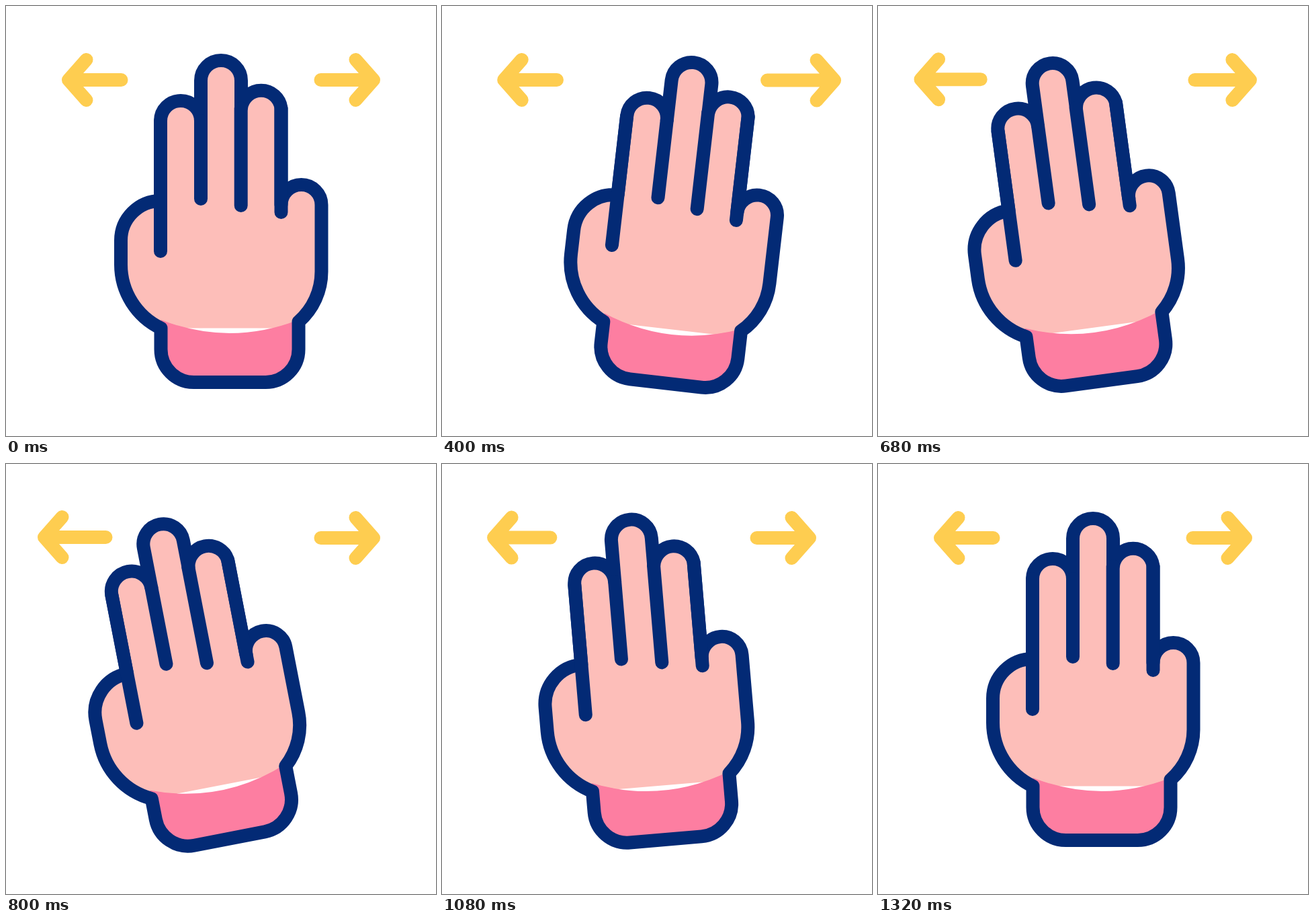
These frames come from a looping animation (640x640 px, 1480 ms). An HTML page:

```html
<!DOCTYPE html>
<html lang="en">
<head>
<meta charset="utf-8">
<title>Three-finger swipe</title>
<style>
  html, body { margin: 0; width: 100%; height: 100%; overflow: hidden; background: #fff; }
  svg { display: block; width: 100vw; height: 100vh; }
  path { fill: none; stroke-width: 20; stroke-linecap: round; stroke-linejoin: round; }
  .arrow { stroke: #fecd50; }
  .skin { fill: #fdbeb9; }
  .wrist { fill: #fd7ea1; }
  .outline { stroke: #032a75; }
</style>
</head>
<body>
<svg viewBox="0 0 640 640">
  <defs>
    <path id="palm" d="M230 290A59 59 0 0 0 171 349V385A105 105 0 0 0 230.5 479.5V511
      A49 49 0 0 0 279.5 560H386.500A49 49 0 0 0 435.500 511V470A99 99 0 0 0 469.500 395
      V296a30 30 0 0 0-60 0V152a30 30 0 0 0-59.500 0V111a30 30 0 0 0-60 0V171a30 30 0 0 0-60 0Z"/>
  </defs>
  <path id="left" class="arrow"/>
  <path id="right" class="arrow"/>
  <g id="hand">
    <use href="#palm" class="skin" style="fill:#fdbeb9"/>
    <path class="skin" d="M230 290A59 59 0 0 0 171 349V385A105 105 0 0 0 230.500 479.500H435.500V470
      A99 99 0 0 0 469.500 395V296a30 30 0 0 0-60 0V152a30 30 0 0 0-59.500 0V111a30 30 0 0 0-60 0V171a30 30 0 0 0-60 0Z"/>
    <path class="wrist" d="M230.500 467Q333 507 435.500 467V511A49 49 0 0 1 386.500 560H279.500A49 49 0 0 1 230.500 511Z"/>
    <use href="#palm" class="outline"/>
    <path class="outline" d="M230 171V365M290 171V287M349.700 152V297M409.500 152V307"/>
  </g>
</svg>
<script>
const LOOP = 1480, STEP = 40;
const KEYS = [40, 360, 800, 1320];
const [hand, left, right] = ["hand", "left", "right"].map(id => document.getElementById(id));

// Smoothstep between one value per key time
function track(t, values) {
  if (t <= KEYS[0]) return values[0];
  for (let i = 1; i < KEYS.length; i++) {
    if (t < KEYS[i]) {
      const u = (t - KEYS[i - 1]) / (KEYS[i] - KEYS[i - 1]);
      return values[i - 1] + (values[i] - values[i - 1]) * u * u * (3 - 2 * u);
    }
  }
  return values[KEYS.length - 1];
}

// dir is -1 for left, 1 for right
function drawArrow(el, dir, tail, tip, y) {
  const back = tip - dir * 26.5;
  el.setAttribute("d", `M${tail} ${y}H${tip}M${back} ${y - 30}L${tip} ${y}L${back} ${y + 30}`);
}

function render(now) {
  const t = Math.floor(now % LOOP / STEP) * STEP;
  const toRight = track(t, [0, 1, 0, 0]);
  const toLeft = track(t, [0, 0, 1, 0]);
  hand.setAttribute("transform", `rotate(${track(t, [0, 7, -11, 0])} 320 560)`);
  drawArrow(left, -1, 171.5 - 23 * toLeft, 93 - 36 * toLeft, 110 - toLeft);
  drawArrow(right, 1, 468.5 + 16 * toRight, 547 + 38 * toRight, 110 + 0.6 * toRight);
}

const start = performance.now();
function tick() {
  render(performance.now() - start);
  requestAnimationFrame(tick);
}
tick();
</script>
</body>
</html>
```
